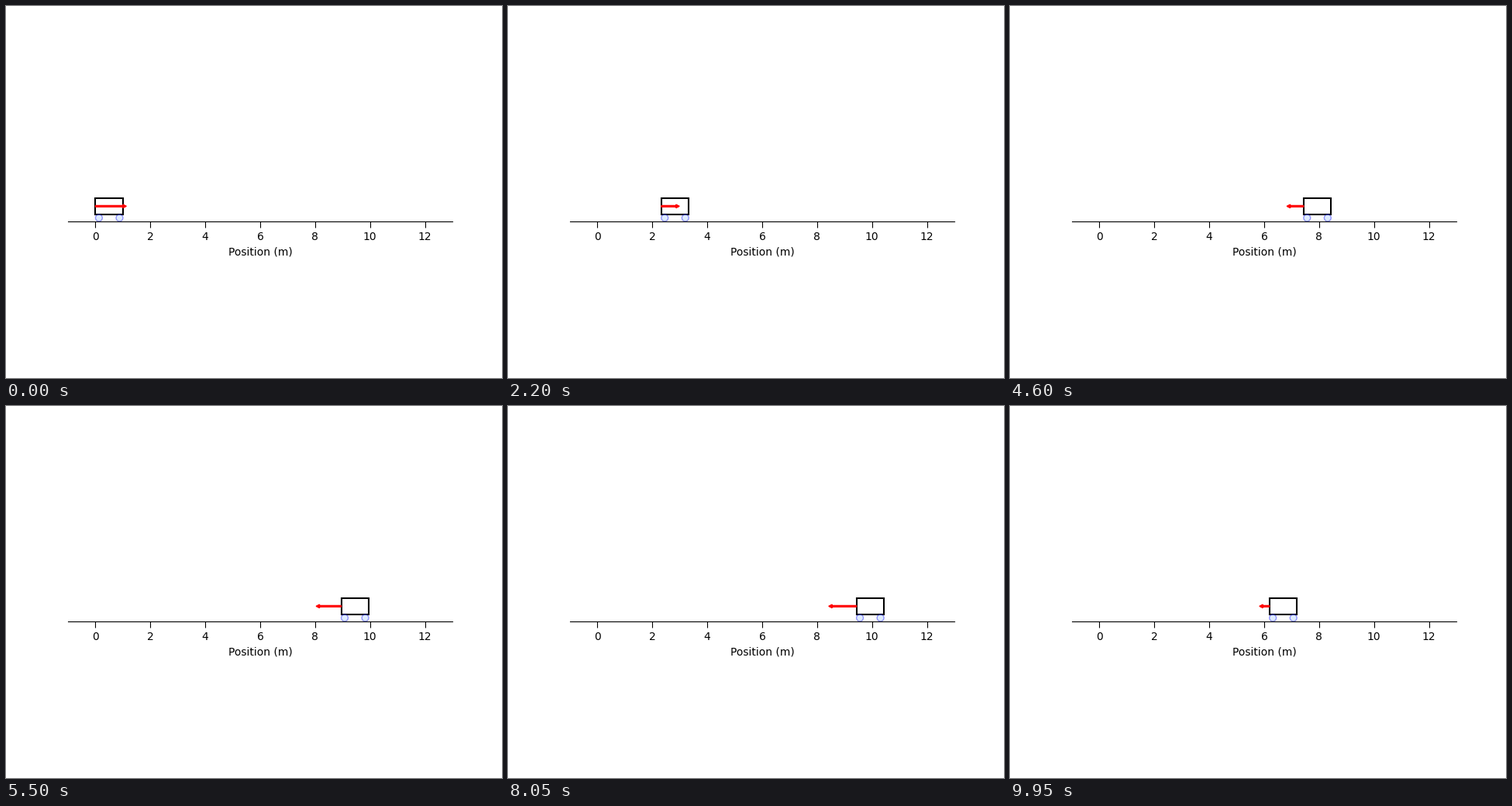
A matplotlib script for the animation above (10 s loop, 640 by 480 pixels).

```python
import numpy as np
import matplotlib.pyplot as plt
from matplotlib.animation import FuncAnimation
from matplotlib.patches import Circle, FancyArrow, Rectangle

FRAMES = 200
DT = 0.05
AMPLITUDE = 5.0
OMEGA = np.sqrt(1 / AMPLITUDE)

CART_W, CART_H = 1.0, 0.6
WHEEL_R = 0.125
WHEEL_X = (WHEEL_R, CART_W - WHEEL_R)
ARROW_Y = 2 * WHEEL_R + CART_H / 2

fig, ax = plt.subplots(figsize=(6.4, 4.8), dpi=100)
ax.set_xlim(-1, 13)
ax.set_ylim(0, 2)
ax.set_aspect("equal")
ax.set_yticks([])
ax.set_xticks(range(0, 13, 2))
ax.tick_params(axis="x", length=6)
ax.set_xlabel("Position (m)")
for side in ("left", "right", "top"):
    ax.spines[side].set_visible(False)

cart = ax.add_patch(Rectangle((0, 2 * WHEEL_R), CART_W, CART_H,
                              fill=False, ec="black", lw=1.5))
wheels = [ax.add_patch(Circle((dx, WHEEL_R), WHEEL_R, fc="#b0d0ff",
                              ec="blue", alpha=0.4))
          for dx in WHEEL_X]
arrow = ax.add_patch(FancyArrow(0, ARROW_Y, 1, 0, width=0.05, head_width=0.125,
                                head_length=0.125, color="red", lw=1))


def update(i):
    phase = OMEGA * (i + 1) * DT
    x = AMPLITUDE * (1 - np.cos(phase))
    cart.set_x(x)
    for wheel, dx in zip(wheels, WHEEL_X):
        wheel.center = (x + dx, WHEEL_R)
    arrow.set_data(x=x, dx=np.cos(phase))
    return [cart, *wheels, arrow]


anim = FuncAnimation(fig, update, frames=FRAMES, interval=1000 * DT,
                     repeat=True, repeat_delay=0)
plt.show()
```
